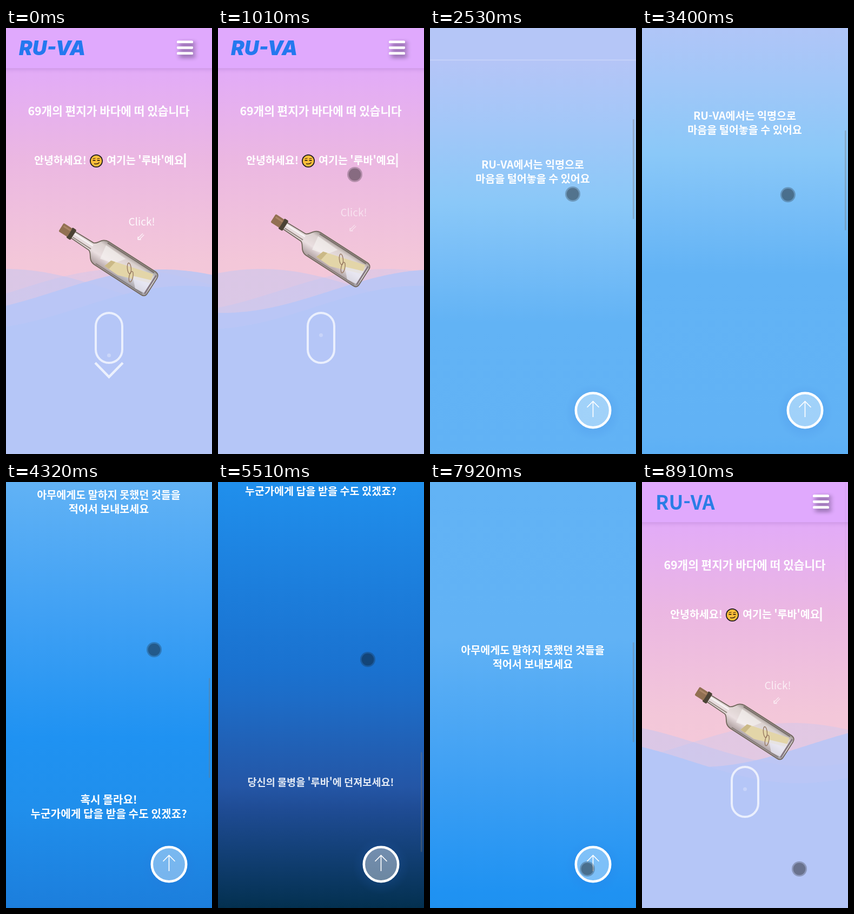
An HTML page with a canvas for the animation above (8980 ms loop, 381 by 785 pixels).

```html
<!DOCTYPE html>
<html lang="ko">
<head>
<meta charset="utf-8">
<title>RU-VA</title>
<style>
html, body { margin: 0; width: 100%; height: 100%; overflow: hidden; }
canvas { display: block; width: 381px; height: 785px; }
</style>
</head>
<body>
<canvas id="stage"></canvas>
<script>
const W = 381, H = 785, LOOP = 8980, PAGE = 3349;
const canvas = document.getElementById('stage');
const ctx = canvas.getContext('2d');
const ratio = window.devicePixelRatio || 1;
canvas.width = W * ratio;
canvas.height = H * ratio;

const SANS = '"Noto Sans CJK KR", "Noto Sans CJK", "Noto Sans", sans-serif';
const SEA = '#b5c6f7';
const TAU = Math.PI * 2;

const clamp = v => Math.max(0, Math.min(1, v));
const smooth = p => p * p * (3 - 2 * p);
const easeOut = (p, power) => 1 - Math.pow(1 - p, power);
const progress = (t, start, length) => clamp((t - start) / length);

// start, end, from, to, ease-out power (0 = smoothstep)
const SCROLLS = [
  [1040, 1880, 0, 470, 0],
  [1880, 2660, 470, 729, 2.7],
  [2800, 3140, 729, 785, 2],
  [3340, 3660, 785, 880, 2],
  [3860, 4720, 880, 1668, 2.7],
  [5050, 5910, 1668, 2564, 0],
  [7460, 8380, 2564, 0, 0]
];

// time, x, y
const POINTER = [
  [700, 396, 190], [1010, 253, 270], [1930, 262, 302], [2530, 264, 306],
  [3860, 273, 308], [4320, 274, 309], [4720, 276, 316], [4850, 277, 317],
  [5510, 277, 327], [6000, 278, 332], [7060, 285, 616], [7320, 291, 713], [8980, 291, 713]
];

const SKY = [[0, '#e0a8ff'], [74, '#e2abf8'], [240, '#ebb7e2'], [430, '#f3c7d9'], [560, '#f5cad8']];
const DEPTHS = [
  [785, '#b5c5f7'], [910, '#a2c7f8'], [1050, '#8ac8f8'], [1160, '#76bdf7'], [1270, '#62b3f5'],
  [1569, '#61b2f5'], [1819, '#3fa0f4'], [2039, '#1f92f2'], [2169, '#208fec'], [2354, '#1c7edc'],
  [2504, '#1a72d0'], [2564, '#1d6cc7'], [2724, '#2456a6'], [2764, '#1f4c95'], [2949, '#03304f'],
  [3064, '#012634'], [3144, '#001e26'], [PAGE, '#001c22']
];

// crest x at start, crest y, px per second, opacity
const WAVES = [[290, 445, 113, .82], [0, 444, 79, .4], [215, 444, 96, .3], [335, 475, 39.4, 1]];

function scrollAt(t) {
  let y = 0;
  for (const [start, end, from, to, power] of SCROLLS) {
    if (t < start) break;
    const p = progress(t, start, end - start);
    y = from + (to - from) * (power ? easeOut(p, power) : smooth(p));
  }
  return y;
}

function gradient(stops) {
  const top = stops[0][0], span = stops[stops.length - 1][0] - top;
  const g = ctx.createLinearGradient(0, top, 0, top + span);
  stops.forEach(([y, color]) => g.addColorStop((y - top) / span, color));
  return g;
}

function text(str, x, y, size, { weight = 400, align = 'center', color = '#fff', family = SANS } = {}) {
  ctx.font = `${weight} ${size}px ${family}`;
  ctx.textAlign = align;
  ctx.textBaseline = 'alphabetic';
  ctx.fillStyle = color;
  ctx.fillText(str, x, y + size * .36);
}

function shape(points, fill) {
  ctx.beginPath();
  points.forEach(([x, y]) => ctx.lineTo(x, y));
  ctx.closePath();
  ctx.fillStyle = fill;
  ctx.fill();
}

function disc(x, y, r, fill) {
  ctx.beginPath();
  ctx.arc(x, y, r, 0, TAU);
  ctx.fillStyle = fill;
  ctx.fill();
}

function line(points, color, width) {
  ctx.beginPath();
  points.forEach(([x, y]) => ctx.lineTo(x, y));
  ctx.strokeStyle = color;
  ctx.lineWidth = width;
  ctx.stroke();
}

function box(x, y, w, h, r, fill, stroke, width) {
  ctx.beginPath();
  ctx.roundRect(x, y, w, h, r);
  if (fill) { ctx.fillStyle = fill; ctx.fill(); }
  if (stroke) { ctx.strokeStyle = stroke; ctx.lineWidth = width; ctx.stroke(); }
}

function layer(draw, alpha = 1) {
  ctx.save();
  ctx.globalAlpha *= alpha;
  draw();
  ctx.restore();
}

function shadow(color, blur, x = 0, y = 0) {
  ctx.shadowColor = color;
  ctx.shadowBlur = blur * ratio;
  ctx.shadowOffsetX = x * ratio;
  ctx.shadowOffsetY = y * ratio;
}

function drawWaves(t) {
  for (const [crest, top, speed, alpha] of WAVES) {
    const x0 = crest + speed * t / 1000;
    layer(() => {
      ctx.beginPath();
      ctx.moveTo(0, 600);
      for (let x = 0; x <= W + 3; x += 3) {
        ctx.lineTo(x, top + 40 - 40 * Math.cos((x - x0) / 396 * Math.PI));
      }
      ctx.lineTo(W + 3, 600);
      ctx.fillStyle = SEA;
      ctx.fill();
    }, alpha);
  }
  ctx.fillStyle = SEA;
  ctx.fillRect(0, 559, W, H - 559);
}

function drawHeader(t) {
  layer(() => {
    shadow('rgba(110,60,140,.22)', 8, 0, 2);
    ctx.fillStyle = '#e0a9fd';
    ctx.fillRect(-10, -10, W + 20, 84);
  });
  if (t < 4500) text('RU-VA', 24, 37, 37, { weight: 'italic 900', align: 'left', color: '#2478ef', family: 'Inter, sans-serif' });
  else text('RU-VA', 25, 38, 36, { weight: 700, align: 'left', color: '#2a7de6' });
  const bars = [23.5, 34, 44.5];
  layer(() => {
    shadow('rgba(45,30,65,.8)', 8, 4, 4);
    bars.forEach(y => box(316, y, 30, 4.5, 2, '#fff'));
  });
  bars.forEach(y => box(316, y, 30, 4.5, 2, '#fff'));
}

function drawSmirk(x, y) {
  disc(x, y, 12, '#1d1a20');
  disc(x, y, 10.3, '#fbbf3a');
  for (const dx of [-4, 4]) {
    line([[x + dx - 2.5, y - 4], [x + dx + 2.5, y - 5]], '#3a2414', 1.2);
    line([[x + dx - 2.5, y - 1], [x + dx + 2.5, y - 1]], '#3a2414', 1.8);
  }
  ctx.beginPath();
  ctx.moveTo(x - 4, y + 5);
  ctx.quadraticCurveTo(x + 3, y + 7, x + 5.5, y + 2.5);
  ctx.strokeStyle = '#3a2414';
  ctx.lineWidth = 1.5;
  ctx.stroke();
}

// Drawn along its own axis: cork at 0, base at 200.
function drawBottle(bob) {
  layer(() => {
    ctx.translate(102, 367 + bob);
    ctx.rotate(.57);
    ctx.beginPath();
    ctx.moveTo(24, -7);
    ctx.lineTo(66, -8);
    ctx.bezierCurveTo(74, -10, 74, -24, 88, -25);
    ctx.lineTo(192, -25);
    ctx.quadraticCurveTo(200, -24, 200, -16);
    ctx.lineTo(200, 17);
    ctx.quadraticCurveTo(200, 25, 192, 25);
    ctx.lineTo(88, 25);
    ctx.bezierCurveTo(74, 24, 74, 10, 66, 8);
    ctx.lineTo(24, 7);
    ctx.closePath();
    const glass = ctx.createLinearGradient(0, -25, 0, 25);
    glass.addColorStop(0, 'rgba(140,136,128,.85)');
    glass.addColorStop(.2, 'rgba(216,212,206,.85)');
    glass.addColorStop(.6, 'rgba(232,229,226,.8)');
    glass.addColorStop(1, 'rgba(150,142,138,.8)');
    ctx.fillStyle = glass;
    ctx.fill();
    ctx.strokeStyle = '#71675c';
    ctx.lineWidth = 1.8;
    ctx.stroke();
    shape([[88, -17], [132, -15], [118, 4], [92, 10]], 'rgba(250,248,246,.55)');
    line([[88, -22], [190, -22]], 'rgba(80,72,62,.55)', 2.5);
    line([[90, 22], [192, 22]], 'rgba(90,82,74,.45)', 2);
    line([[28, -3], [68, -3]], 'rgba(255,255,255,.7)', 3);
    line([[28, 4], [68, 4]], 'rgba(95,85,70,.6)', 2);
    shape([[106, 17], [111, 2], [190, -19], [194, -2], [136, 18]], '#e3d5a8');
    shape([[106, 17], [111, 2], [119, 0], [116, 17]], '#cbb987');
    shape([[160, 4], [194, -8], [196, 19], [176, 21]], 'rgba(233,232,246,.75)');
    ctx.strokeStyle = '#94755e';
    ctx.lineWidth = 1.3;
    for (const [dx, turn] of [[-5, .9], [6, 1.2]]) {
      ctx.beginPath();
      ctx.ellipse(152 + dx, 1 + dx, 10, 3.5, turn, 0, TAU);
      ctx.stroke();
    }
    line([[196, -20], [196, 20]], '#867a82', 3);
    box(18, -11, 9, 22, 2, '#4c4335');
    box(0, -9, 19, 18, 2, '#927052');
    line([[3, -4], [18, -4]], '#ab8566', 3);
  });
}

function drawScrollHint(t) {
  const q = (t / 1975 + .49) % 1;
  box(166, 525, 49, 92, 24.5, null, 'rgba(255,255,255,.72)', 4);
  const dotAlpha = q < .5 ? .25 + .6 * Math.sin(TAU * q) : .25 * Math.abs(2 * q - 1.5) * 2;
  layer(() => disc(190.5, 566 + 38 * Math.min(1, 2 * q), 3.5, '#fff'), dotAlpha);
  layer(() => line([[165, 617], [190.5, 643], [216, 617]], '#fff', 4.5), .75 * Math.sin(Math.PI * q) ** 2);
}

function drawHome(t) {
  ctx.fillStyle = gradient(SKY);
  ctx.fillRect(0, 0, W, H);
  drawWaves(t);
  drawHeader(t);
  text('69개의 편지가 바다에 떠 있습니다', 190, 153, 21.3, { weight: 700 });
  const greeting = { weight: 700, align: 'left' };
  text('안녕하세요!', 52, 244, 19.5, greeting);
  drawSmirk(167, 245);
  text("여기는 '루바'예요", 186, 244, 19.5, greeting);
  layer(() => {
    ctx.fillStyle = '#fff';
    ctx.fillRect(329.5, 231, 3, 26);
  }, .5 + .5 * Math.cos(TAU * t / 898));

  const bob = -18 * Math.sin(TAU * t / 3240);
  drawBottle(bob);
  layer(() => {
    text('Click!', 251, 357 + bob, 19, { weight: 500 });
    text('⇙', 249, 384 + bob, 20, { family: '"DejaVu Sans", sans-serif' });
  }, .7 + .2 * Math.cos(TAU * t / 1700));
  drawScrollHint(t);
}

function reveal(t, lines, y, start, length, fromScale) {
  const k = easeOut(progress(t, start, length), 2);
  layer(() => {
    ctx.translate(190, y);
    const s = fromScale + (1 - fromScale) * k;
    ctx.scale(s, s);
    lines.forEach((str, i) => text(str, 0, (i - (lines.length - 1) / 2) * 25.5, 19.6, { weight: 700 }));
  }, clamp(1.8 * k));
}

function drawEnvelope(x, y) {
  shape([[x - 13, y - 3], [x, y - 14], [x + 13, y - 3], [x + 13, y + 13], [x - 13, y + 13]], '#12283c');
  shape([[x - 10, y - 3], [x, y - 10], [x + 10, y - 3], [x, y + 5]], '#83bce8');
  disc(x - 3, y - 8, 4, '#a8412f');
  disc(x + 3, y - 8, 4, '#a8412f');
  shape([[x - 6.5, y - 6], [x + 6.5, y - 6], [x, y + 2]], '#a8412f');
  shape([[x - 12, y - 2], [x, y + 5], [x + 12, y - 2], [x + 12, y + 12], [x - 12, y + 12]], '#f2f6fb');
  shape([[x - 12, y + 12], [x, y + 4], [x + 12, y + 12]], '#b9dcf5');
}

function drawThrowButton(t) {
  const k = smooth(progress(t, 5980, 1250));
  layer(() => {
    ctx.translate(0, 30 * (1 - easeOut(progress(t, 5980, 880), 2)));
    box(38, 2756, 304, 49, 9, 'rgba(20,60,115,.35)', 'rgba(255,255,255,.88)', 2);
    text('물병 던지기', 190, 2780, 22.6, { weight: 700 });
    drawEnvelope(103, 2781);
    drawEnvelope(278, 2781);
  }, k);
}

function drawDepths(t) {
  ctx.fillStyle = gradient(DEPTHS);
  ctx.fillRect(0, 785, W, PAGE - 785);
  ctx.fillStyle = 'rgba(255,255,255,.2)';
  ctx.fillRect(0, 785, W, 2);
  reveal(t, ['RU-VA에서는 익명으로', '마음을 털어놓을 수 있어요'], 992, 1450, 800, .9);
  reveal(t, ['아무에게도 말하지 못했던 것들을', '적어서 보내보세요'], 1605, 3500, 700, .9);
  reveal(t, ['혹시 몰라요!', '누군가에게 답을 받을 수도 있겠죠?'], 2167, 3900, 700, 1.2);
  reveal(t, ["당신의 물병을 '루바'에 던져보세요!"], 2716, 5200, 1100, .9);
  drawThrowButton(t);
  text('[KELNO] 7기 대전 1반 자율프로젝트 - 루바', 190, 3228, 14.5);
  text('[Backend | 남도율 편세온 왕하름]', 190, 3263, 14.5);
  text('[Frontend | 표라온 진누리 엄보슬]', 190, 3281, 14.5);
  text('© 2022 RU-VA. All rights reserved.', 190, 3317, 13.7);
  ctx.fillStyle = '#dfe5e8';
  ctx.fillRect(0, PAGE - 1, W, 1);
}

function drawTopButton(scroll) {
  layer(() => {
    const glow = ctx.createRadialGradient(301.5, 708, 30, 301.5, 708, 52);
    glow.addColorStop(0, 'rgba(45,110,215,.13)');
    glow.addColorStop(1, 'rgba(45,110,215,0)');
    ctx.beginPath();
    ctx.arc(301.5, 708, 52, 0, TAU);
    ctx.arc(301.5, 704.5, 33, 0, TAU, true);
    ctx.fillStyle = glow;
    ctx.fill();
    disc(301.5, 704.5, 30, 'rgba(255,255,255,.4)');
    ctx.beginPath();
    ctx.arc(301.5, 704.5, 31.7, 0, TAU);
    ctx.strokeStyle = '#fff';
    ctx.lineWidth = 4.6;
    ctx.stroke();
    line([[301.5, 717], [301.5, 688]], '#fff', 1.7);
    line([[290.5, 699], [301.5, 688], [312.5, 699]], '#fff', 1.7);
  }, clamp((scroll - 200) / 250));
}

function drawScrollbar(t, scroll) {
  const last = SCROLLS.filter(s => s[0] <= t).pop();
  if (!last) return;
  const [, end, , to] = last;
  const fade = to === 0 ? progress(t, end, 600) : progress(t, end + 1000, 400);
  layer(() => box(375, scroll * .2297 + 1, 2.5, 184, 1, '#777'), .38 * (1 - fade));
}

function drawPointer(t) {
  const i = POINTER.findIndex(p => p[0] > t);
  if (i < 1) return;
  const [t0, x0, y0] = POINTER[i - 1], [t1, x1, y1] = POINTER[i];
  const p = (t - t0) / (t1 - t0);
  const x = x0 + (x1 - x0) * p, y = y0 + (y1 - y0) * p;
  disc(x, y, 14, 'rgba(30,30,30,.27)');
  disc(x, y, 11.3, 'rgba(0,0,0,.25)');
}

function frame(now) {
  const t = now % LOOP;
  const scroll = scrollAt(t);
  ctx.setTransform(ratio, 0, 0, ratio, 0, 0);
  layer(() => {
    ctx.translate(0, -scroll);
    if (scroll < H) drawHome(t);
    if (scroll > 0) drawDepths(t);
  });
  drawTopButton(scroll);
  drawScrollbar(t, scroll);
  drawPointer(t);
}

let begin;
function tick(now) {
  begin ??= now;
  frame(now - begin);
  requestAnimationFrame(tick);
}
requestAnimationFrame(tick);
</script>
</body>
</html>
```
